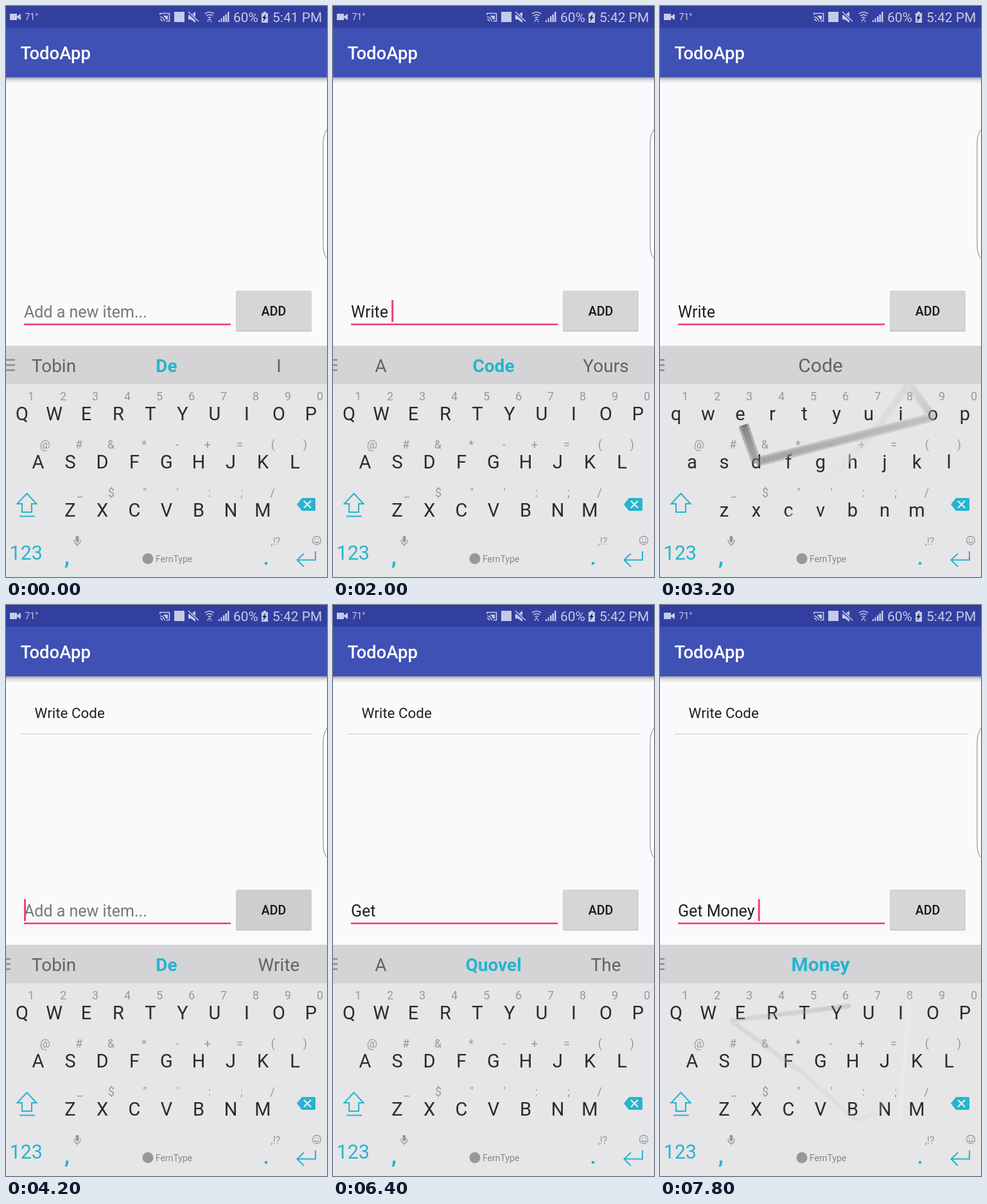
An HTML page with a canvas that plays this animation: 500x889 px, repeating every 8000 ms.

```html
<!DOCTYPE html>
<html lang="en">
<head>
<meta charset="utf-8">
<title>TodoApp</title>
<style>
html, body { margin: 0; width: 100%; height: 100%; overflow: hidden; background: #faf9fc; }
svg, canvas { position: absolute; left: 0; top: 0; width: 500px; height: 889px; display: block; }
text { font-family: Roboto, sans-serif; white-space: pre; }
.mid { text-anchor: middle; }
.end { text-anchor: end; }
.key { font-size: 29px; fill: #2b2b2d; }
.hint { font-size: 18px; fill: #98979a; }
.status { fill: #c5cae9; }
.cyan { fill: #26b4cf; }
.line { fill: none; stroke: #26b4cf; stroke-width: 2; }
.thin { fill: none; stroke: #c5cae9; stroke-width: 1.6; }
</style>
</head>
<body>
<svg viewBox="0 0 500 889">
  <defs>
    <linearGradient id="shade" x2="0" y2="1">
      <stop stop-color="#000" stop-opacity=".36"/>
      <stop offset=".45" stop-color="#000" stop-opacity=".11"/>
      <stop offset="1" stop-color="#000" stop-opacity="0"/>
    </linearGradient>
  </defs>
  <rect width="500" height="889" fill="#faf9fc"/>
  <rect y="111" width="500" height="10" fill="url(#shade)"/>
  <rect y="33" width="500" height="78" fill="#3f51b5"/>
  <rect width="500" height="34" fill="#323f9f"/>

  <g class="status">
    <path d="M6 12h11v10H6zM17 16l6-4v10l-6-4z"/>
    <text x="29.500" y="22" font-size="14">71°</text>
    <path class="thin" d="M240 14v-2.500h14.500v12h-5M240 17a7 7 0 0 1 7 7M240 20.500a4 4 0 0 1 3.500 3.500"/>
    <path d="M245 15h7v6h-3q-1-4-4-5z"/>
    <rect x="262" y="9" width="16" height="16"/>
    <path d="M284 14h4l7-5v17l-7-5h-4z"/>
    <path d="M284 10l16 14" stroke="#323f9f" stroke-width="4"/>
    <path class="thin" d="M284 9l16 15"/>
    <path class="thin" d="M310 12q7-5 14 0M312 15.500q5-4 10 0M314.500 18.500q2.500-2 5 0"/>
    <path d="M315.500 20h3v2h-3zM313 22.500h3l-1.500 2.500zM318 24.500h3l-1.500-2.500z"/>
    <path d="M331 22h2v3h-2zM334.500 19h2v6h-2zM338 16h2.500v9H338zM341.500 13h2.500v12h-2.500zM345 9h2.500v16H345z"/>
    <text x="354" y="25" font-size="21">60%</text>
    <path d="M398 11h3V9h4v2h3v15h-10z"/>
    <path d="M405 12l-6 7h3l-2 6 6-8h-3z" fill="#172050"/>
    <text id="clock" x="415" y="25" font-size="21"></text>
  </g>
  <text x="22.500" y="83" font-size="27.500" font-weight="500" fill="#fff">TodoApp</text>

  <g id="item">
    <text x="44.500" y="175.500" font-size="22.400" fill="#202022">Write Code</text>
    <rect x="22" y="200" width="456" height="1.500" fill="#dad9dc"/>
  </g>
  <path d="M501 191Q494 199 494 214V372Q494 388 501 394" fill="#fff" stroke="#818084"/>

  <text id="input" x="28" y="485" font-size="25"></text>
  <rect x="28" y="494.400" width="322" height="2.600" fill="#f43d7c"/>
  <rect id="cursor" y="458" width="3" height="34" fill="#f43d7c"/>
  <rect x="358" y="444" width="118" height="63" rx="2" fill="#b9b8bb" opacity=".75"/>
  <rect id="button" x="358.500" y="443" width="117" height="62" rx="2"/>
  <text class="mid" x="417" y="481.500" font-size="19.500" font-weight="500" fill="#161618">ADD</text>

  <rect y="529" width="500" height="60" fill="#d4d3d5"/>
  <rect y="589" width="500" height="300" fill="#e6e5e7"/>
  <path id="menu" stroke="#8b8a8d" stroke-width="2.500"/>
  <g id="words"></g>
  <g id="keys"></g>

  <path class="line" d="M32.500 759L47.500 775H40V788H25V775H17.500Z"/>
  <path id="caps" class="line" d="M21 794.500H45"/>
  <path class="cyan" d="M453 776l8-10h19q2 0 2 2v16q0 2-2 2h-19z"/>
  <path d="M464 770.500l11 11m0-11l-11 11" stroke="#eee" stroke-width="2.200"/>
  <text class="cyan" x="5.500" y="862" font-size="30.500">123</text>
  <text class="cyan mid" x="95" y="869" font-size="34" font-weight="700">,</text>
  <text class="cyan mid" x="405" y="870" font-size="30" font-weight="700">.</text>
  <path class="line" d="M482 849V862.500H454M464 852.500L453.500 862.500L464 873"/>
  <rect x="108.500" y="825" width="5" height="10" rx="2.500" fill="#98979a"/>
  <path d="M106 831q0 7 5 7t5-7M111 838v3" fill="none" stroke="#98979a" stroke-width="1.300"/>
  <text class="hint mid" x="420" y="839" style="font-size:16px">,!?</text>
  <g fill="none" stroke="#98979a" stroke-width="1.300">
    <circle cx="484" cy="832" r="6.500"/><path d="M480.500 833.500q3.500 4 7 0M481.500 829v2M486.500 829v2"/>
  </g>
  <circle cx="221" cy="860.500" r="8.500" fill="#98979a"/>
  <text x="233" y="866" font-size="14" fill="#88878a">FernType</text>
</svg>
<canvas id="trail" width="500" height="889"></canvas>

<script>
const LOOP = 8000, STEP = 200;
const $ = id => document.getElementById(id);
const label = (text, x, y, cls, attrs = '') =>
  `<text class="${cls}" x="${x}" y="${y}" ${attrs}>${text}</text>`;

const rows = [
  { keys: 'qwertyuiop', hints: '1234567890', x: 25, y: 645 },
  { keys: 'asdfghjkl', hints: '@#&*-+=()', x: 50, y: 720 },
  { keys: 'zxcvbnm', hints: '_$"\':;/', x: 100, y: 795 }
];
$('keys').innerHTML = rows.map(({ keys, hints, x, y }) =>
  [...keys].map((k, i) => label(k, x + 50 * i, y, 'key mid')).join('') +
  [...hints].map((h, i) => label(h === '&' ? '&amp;' : h, x + 19 + 50 * i, y - 31, 'hint end')).join('')
).join('');
const keyLabels = [...document.querySelectorAll('.key')];

// Swipes over the keyboard: points are [time, x, y]
const swipes = [
  { commit: 1600, keep: 262, points: [[850, 70, 637], [980, 180, 630], [1140, 387, 636], [1260, 262, 640], [1340, 180, 630], [1400, 137, 622]] },
  { commit: 3400, keep: 900, points: [[2400, 202, 794], [2500, 297, 702], [2550, 345, 648], [2600, 388, 588], [2800, 425, 640], [3000, 150, 710], [3250, 125, 638]] },
  { commit: 5800, keep: 900, points: [[5300, 262, 710], [5440, 100, 642], [5600, 192, 628], [5700, 226, 633]] },
  { commit: 7600, keep: 1200, points: [[6750, 372, 808], [6950, 390, 605], [7100, 342, 790], [7180, 305, 803], [7250, 228, 733], [7350, 110, 647], [7500, 297, 624]] }
];

// [time, words, committed]
const suggestions = [
  [0, ['Tobin', 'De', 'I']], [1000, ['We']], [1200, ['Air']], [1600, ['Write'], true],
  [2000, ['A', 'Code', 'Yours']], [2550, ['Co']], [3000, ['Cod']], [3200, ['Code']], [3400, ['Code'], true],
  [4000, ['Tobin', 'De', 'Write']], [5400, ['He']], [5800, ['Get'], true],
  [6200, ['A', 'Quovel', 'The']], [6800, ['Me']], [7200, ['Mine']], [7400, ['Money']], [7600, ['Money'], true]
];
const typed = [[0, ''], [1600, 'Write '], [3400, 'Write Code '], [4000, ''], [5800, 'Get '], [7600, 'Get Money ']];
const pressed = [[0, '#d6d5d7'], [3800, '#c5c4c6'], [4000, '#c9c8ca'], [4200, '#cecdcf'], [4400, '#d6d5d7']];
const latest = (list, t) => list.findLastIndex(e => e[0] <= t);

function wordsMarkup([, words, committed], opacity) {
  const single = words.length === 1;
  return words.map((word, i) => {
    const bold = committed || (!single && i === 1);
    const x = single ? 250 : [74.5, 250, 425][i];
    const size = single ? 30 : 28;
    return label(word, x, 569.5, bold ? 'cyan mid' : 'mid',
      `font-size="${size}" opacity="${opacity}" ${bold ? 'font-weight="700"' : 'fill="#636265"'}`);
  }).join('');
}

function pointAt(points, t) {
  const i = Math.max(1, points.findIndex(p => p[0] >= t));
  const [a, b] = [points[i - 1], points[i]];
  const k = (t - a[0]) / (b[0] - a[0]);
  return [a[1] + (b[1] - a[1]) * k, a[2] + (b[2] - a[2]) * k];
}

const ctx = $('trail').getContext('2d');
ctx.beginPath();
ctx.rect(0, 589, 500, 300);
ctx.clip();

function strokeLine(mode, color, width, x0, y0, x1, y1) {
  ctx.globalCompositeOperation = mode;
  ctx.strokeStyle = color;
  ctx.lineWidth = width;
  ctx.beginPath();
  ctx.moveTo(x0, y0);
  ctx.lineTo(x1, y1);
  ctx.stroke();
}

function drawTrail({ points, keep }, t) {
  const first = points[0][0], end = points.at(-1)[0];
  const release = Math.max(0, (t - end) / 600);
  if (t <= first || release >= 1) return;
  const head = Math.min(t, end);
  for (let s = Math.max(first, t - keep); s < head; s += 5) {
    const age = Math.min(1, (t - s) / 900);
    const [x0, y0] = pointAt(points, s);
    const [x1, y1] = pointAt(points, Math.min(head, s + 5));
    const len = Math.hypot(x1 - x0, y1 - y0) || 1;
    const over = Math.min(1.5, len) / len;
    const line = [x0 - (x1 - x0) * over, y0 - (y1 - y0) * over, x1, y1];
    const width = (16 - 5 * age) * (1 - 0.8 * release);
    const shade = 65 + 190 * age ** 0.8;
    const alpha = (0.7 - 0.3 * age) * (1 - release);
    const gray = a => `rgba(${shade},${shade},${shade},${a})`;
    // Newer pieces replace older ones, so overlaps do not darken
    strokeLine('destination-out', '#000', width, ...line);
    // Soft edges around a denser core
    strokeLine('source-over', gray(alpha * 0.6), width, ...line);
    strokeLine('destination-out', '#000', width * 0.6, ...line);
    strokeLine('source-over', gray(alpha), width * 0.6, ...line);
  }
}

function cursorOn(t, since) {
  return since === 0 ? t > 450 && t < 950 : (t - since) % 1000 < 500;
}

let shown = -1;
function render(t) {
  if (t === shown) return;
  shown = t;
  $('clock').textContent = t < 2000 ? '5:41 PM' : '5:42 PM';
  $('item').style.display = t < 4000 ? 'none' : '';
  $('button').setAttribute('fill', pressed[latest(pressed, t)][1]);

  const [since, text] = typed[latest(typed, t)];
  const input = $('input');
  input.textContent = text || 'Add a new item...';
  input.setAttribute('fill', text ? '#202022' : '#77767a');
  $('cursor').setAttribute('x', text ? 27 + input.getComputedTextLength() : 28);
  $('cursor').style.display = cursorOn(t, since) ? '' : 'none';

  const lower = swipes.some(s => t >= s.points[0][0] && t < s.commit);
  for (const key of keyLabels) {
    const k = key.textContent;
    key.textContent = lower ? k.toLowerCase() : k.toUpperCase();
  }
  $('caps').style.display = lower ? 'none' : '';

  // The previous words fade out under the new ones
  const now = latest(suggestions, t);
  const age = t - suggestions[now][0];
  const fading = now > 0 && age > 0 && age < 150;
  $('words').innerHTML = wordsMarkup(suggestions[now], 1) +
    (fading ? wordsMarkup(suggestions[now - 1], 0.1 * (1 - age / 150)) : '');
  const m = t < 1000 || (t >= 5400 && t < 5800) ? 14 : 7;
  $('menu').setAttribute('d', `M0 551H${m}M0 559H${m}M0 567H${m}`);

  ctx.clearRect(0, 0, 500, 889);
  swipes.forEach(s => drawTrail(s, t));
}

const start = performance.now();
function frame() {
  const t = (performance.now() - start) % LOOP;
  render(Math.floor(t / STEP) * STEP);
  requestAnimationFrame(frame);
}
frame();
</script>
</body>
</html>
```
